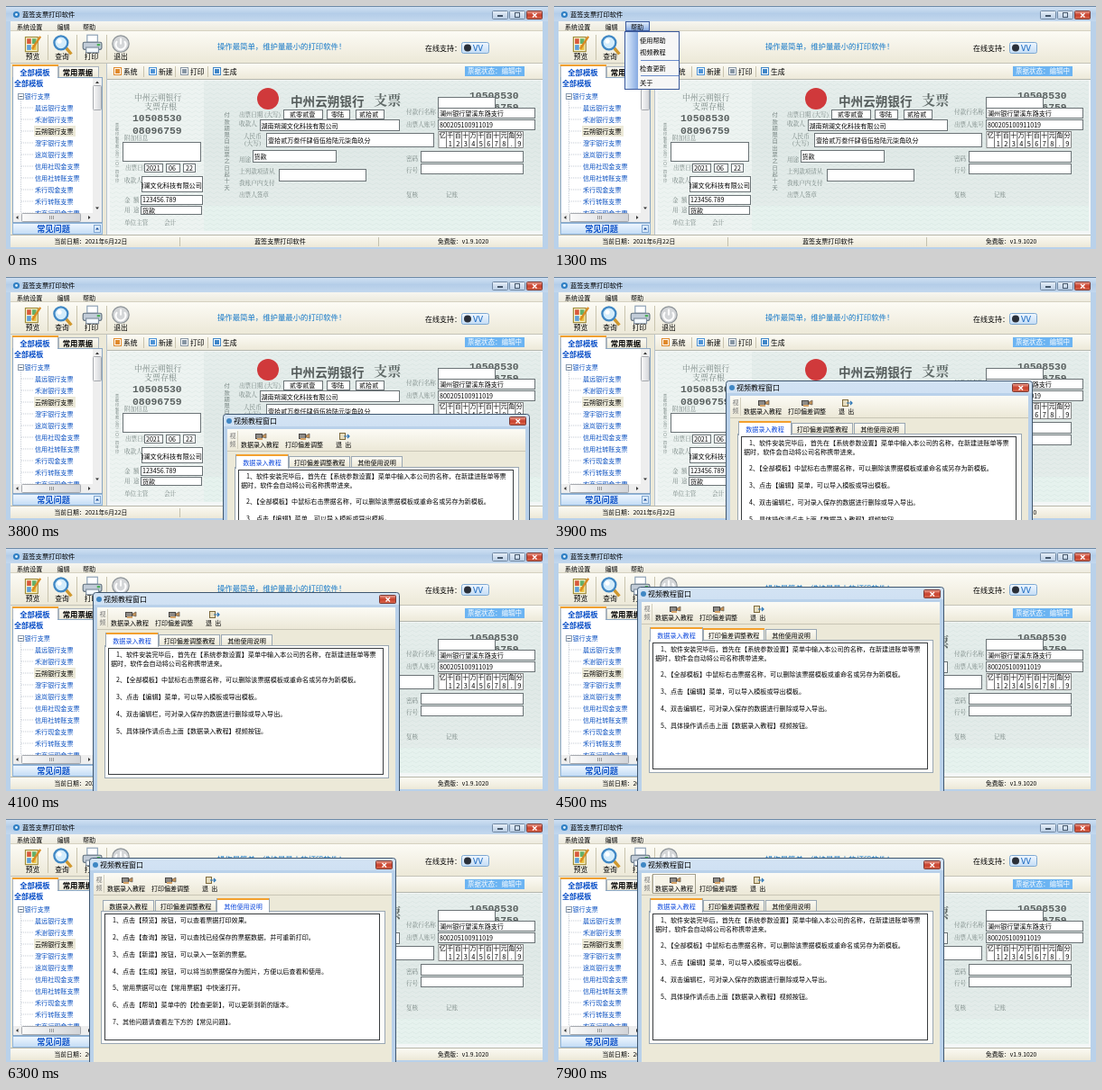
These frames come from a looping animation (600x270 px, 8000 ms). An HTML page:

```html
<!DOCTYPE html>
<html lang="zh-CN">
<head>
<meta charset="utf-8">
<title>支票打印</title>
<style>
html, body { margin: 0; width: 100%; height: 100%; overflow: hidden; background: #b9d1ea; }
svg { display: block; width: 600px; height: 270px; }
text { font-family: "Noto Sans CJK SC", "Noto Sans CJK", "Noto Sans CJK JP", sans-serif; font-weight: 500; white-space: pre; }
.bold { font-weight: 700; }
.num { font-family: "Liberation Mono", "DejaVu Sans Mono", monospace; font-weight: 700; }
.song { font-family: "Noto Serif CJK SC", "Noto Sans CJK SC", "Noto Sans CJK", serif; }
.dialog { animation: drag 8s step-end infinite; }
@keyframes drag {
  0% { opacity: 0; transform: translate(265px, 183px); }
  32.5% { opacity: .7; transform: translate(265px, 183px); }
  33.75% { opacity: 1; transform: translate(265px, 183px); }
  47.5% { opacity: 1; transform: translate(240px, 152px); }
  48.75% { opacity: 1; transform: translate(190px, 115px); }
  50% { opacity: 1; transform: translate(135px, 76px); }
  51.25% { opacity: 1; transform: translate(96px, 49px); }
  52.5% { opacity: 1; transform: translate(93px, 45px); }
  53.75%, 100% { opacity: 1; transform: translate(92px, 43px); }
}
</style>
</head>
<body>
<svg id="stage" viewBox="0 0 600 270" xmlns="http://www.w3.org/2000/svg"></svg>
<script>
const LOOP = 8000;
const rules = [];

// ---- drawing helpers ----
const rect = (x, y, w, h, fill, more = '') =>
  `<rect x="${x}" y="${y}" width="${w}" height="${h}" fill="${fill}" ${more}/>`;
const box = (x, y, w, h, fill = '#fff', stroke = '#6b7376', more = '') =>
  rect(x + .5, y + .5, w - 1, h - 1, fill, `stroke="${stroke}" ${more}`);
const text = (x, y, s, size = 7.1, fill = '#000', more = '') =>
  `<text x="${x}" y="${(y + size * .37).toFixed(2)}" font-size="${size}" fill="${fill}" ${more}>${s}</text>`;
const path = (d, stroke, width = 1, fill = 'none', more = '') =>
  `<path d="${d}" stroke="${stroke}" stroke-width="${width}" fill="${fill}" ${more}/>`;
const disc = (x, y, r, fill, more = '') => `<circle cx="${x}" cy="${y}" r="${r}" fill="${fill}" ${more}/>`;
const grad = (id, across, ...stops) => `<linearGradient id="${id}" x2="${+across}" y2="${+!across}">` +
  stops.map((c, i) => `<stop offset="${i / (stops.length - 1)}" stop-color="${c}"/>`).join('') + '</linearGradient>';
const bold = 'class="bold"', mid = 'text-anchor="middle"';

// Shows a group only during the given [start, end] spans in ms.
function during(id, spans, body) {
  const at = (ms, o) => `${ms / LOOP * 100}%{opacity:${o}}`;
  rules.push(`@keyframes ${id}{0%{opacity:0}${spans.map(([a, b]) => at(a, 1) + at(b, 0)).join('')}}` +
    `.${id}{animation:${id} ${LOOP}ms step-end infinite}`);
  return `<g class="${id}">${body}</g>`;
}

const defs = `<defs>
${grad('glass', false, '#d3e3f4', '#b4cde8', '#c3d8ee')}
${grad('menu', false, '#f7f6f0', '#ece9dc')}
${grad('bar', false, '#fcfbf5', '#ece8d7')}
${grad('red', false, '#eba596', '#c8402c', '#d9694e')}
${grad('knob', false, '#e6eef7', '#b9cde4')}
${grad('thumb', true, '#fafafa', '#d2d4d8')}
${grad('blue', false, '#f0f7ff', '#c3dcf5')}
${grad('open', false, '#e3effd', '#86aae2')}
${grad('gutter', true, '#e3effd', '#86aae2')}
${grad('paper', false, '#e6eeec', '#e0e9e7', '#e4ecea')}
<pattern id="weave" width="8" height="5" patternUnits="userSpaceOnUse">
<path d="M0 2.5Q2 0 4 2.5T8 2.5" fill="none" stroke="#a9c3bf" stroke-width=".5" opacity=".3"/></pattern>
<clipPath id="payee"><rect x="150" y="190" width="68" height="16"/></clipPath>
<clipPath id="tree"><rect x="8" y="79" width="87" height="151"/></clipPath>
</defs>`;

// ---- main window ----
function titleBar() {
  const cross = path('M583 8l4.5 4.5m0-4.5l-4.5 4.5', '#fff', 1.4);
  return rect(0, 0, 600, 270, '#b9d1ea') + rect(0, 0, 600, 17, 'url(#glass)') + rect(0, 0, 600, 1, '#6d8aa6') +
    disc(11.5, 9.5, 3.6, '#2f7fc4') + disc(11.5, 9.5, 1.4, '#d9ecfa') +
    text(18, 9.5, '蓝签支票打印软件', 7.3) +
    box(538, 5, 18, 10, 'url(#knob)', '#7088a3', 'rx="1"') + box(557, 5, 18, 10, 'url(#knob)', '#7088a3', 'rx="1"') +
    box(576, 5, 18, 10, 'url(#red)', '#7b3a35', 'rx="1"') +
    rect(544, 10, 6, 2, '#44566a') + box(563, 7, 6, 6, 'none', '#44566a') + cross;
}

const hot = (x, y, w, h) => box(x, y, w, h, '#ffe3ac', '#3c5a9c');

function menuBar() {
  return rect(5, 17, 589, 11, 'url(#menu)') + rect(5, 27, 589, 1, '#d5d1c0') +
    during('editHot', [[600, 900]], hot(52, 17, 25, 11)) +
    during('helpHot', [[900, 1300]], hot(79, 17, 27, 11)) +
    during('helpOpen', [[1300, 2600]], box(79, 17, 27, 11, 'url(#open)', '#3c5a9c')) +
    text(12, 23, '系统设置') + text(56.5, 23, '编辑') + text(85, 23, '帮助');
}

function toolBar() {
  const grow = (x, body) => `<g transform="translate(${x} 42) scale(1.15) translate(${-x} -40)">${body}</g>`;
  const preview = box(22, 33, 13, 15, '#f8f4cf', '#a08c3a') + rect(24, 35, 4, 5, '#d8583c') + rect(29, 35, 4, 5, '#65b06a') +
    rect(24, 41, 4, 5, '#5c9fd8') + rect(29, 41, 4, 5, '#e8c040') + path('M37 33L29 45', '#d98a22', 2);
  const search = path('M66 44l5 6', '#d0982e', 3) +
    disc(61, 39, 6.5, '#d4edfc', 'stroke="#3f87c4" stroke-width="2"') + disc(59.5, 37.5, 2.2, '#fff');
  const print = box(90, 31, 11, 8, '#fff', '#8ba0b5') + box(86, 38, 19, 8, '#c2ccd8', '#62727f', 'rx="1.5"') +
    box(89, 43, 13, 6, '#f3f8fc', '#8090a0') + rect(100, 40, 3, 2, '#4cb05a');
  const quit = disc(127, 40, 8, '#d4d6d8', 'stroke="#8e9498"') +
    path('M123.5 37.5a4.8 4.8 0 1 0 7 0M127 34.5v6', '#fff', 1.8);
  const words = ['预览', '查询', '打印', '退出'].map((s, i) => text(29.5 + i * 32.5, 56.5, s, 7.8, '#000', mid)).join('');
  const lines = [46, 78, 111].map(x => rect(x, 32, 1, 28, '#c9c4ae')).join('');
  return rect(5, 28, 589, 36, 'url(#bar)') + rect(5, 63, 589, 1, '#c4c3b8') + lines +
    grow(29.5, preview) + grow(62, search) + grow(95, print) + grow(127, quit) + words +
    text(234, 45, '操作最简单，维护量最小的打印软件！', 8.4, '#1478c8') +
    text(464, 47, '在线支持：', 8) +
    box(504, 40, 31, 13, 'url(#blue)', '#7fa9d2', 'rx="2"') + disc(511, 46.5, 4, '#2a2f38') +
    text(517, 46.5, 'VV', 9.5, '#1263bd');
}

function sidePanel() {
  const names = ['晨远银行支票', '禾澍银行支票', '云朔银行支票', '澄宇银行支票', '途岚银行支票', '信用社现金支票',
    '信用社转账支票', '禾行现金支票', '禾行转账支票', '农商行现金支票'];
  const rows = names.map((s, i) => {
    const y = 113 + i * 13;
    return (i == 2 ? rect(31, y - 6, 46, 12, '#ece9d8') : '') +
      path(`M17 ${y}h13`, '#aab4c0', .7, 'none', 'stroke-dasharray="1 1"') +
      text(32, y, s, 7.1, i == 2 ? '#000' : '#0a50c0');
  }).join('');
  return rect(5, 64, 107, 190, '#ece9d8') +
    box(58, 67, 45, 13, 'url(#bar)', '#a9b3bd') + box(7, 65, 51, 15, '#fff', '#a9b3bd') + rect(7, 65, 51, 2, '#f0a030') +
    text(32, 73.5, '全部模板', 8.4, '#0b50c8', `class="bold" ${mid}`) +
    text(79.5, 73.5, '常用票据', 8.4, '#000', `class="bold" ${mid}`) +
    box(7, 79, 100, 162, '#fff', '#8aa7c4') + rect(8, 79, 49, 1, '#fff') +
    '<g clip-path="url(#tree)">' +
    text(9, 86, '全部模板', 8.1, '#0b50c8', bold) +
    path('M16.5 104v128', '#aab4c0', .7, 'none', 'stroke-dasharray="1 1"') +
    box(13, 97, 7, 7, '#fff', '#8a9bb0') + path('M14.5 100.5h4', '#345', .8) +
    text(20.5, 100, '银行支票', 7.1, '#0a50c0') + rows + '</g>' +
    rect(96, 80, 10, 150, '#eeeeee') + box(96, 88, 10, 28, 'url(#thumb)', '#a6a9ae', 'rx="1"') +
    path('M99 86l2-2.5 2 2.5zM99 223.5l2 2.5 2-2.5z', 'none', 0, '#333') +
    rect(8, 230, 98, 10, '#eeeeee') + box(17, 230, 66, 10, 'url(#thumb)', '#a6a9ae', 'rx="1"') +
    path('M48.5 233v4m2-4v4m2-4v4', '#777', .7) +
    path('M13.5 233l-2.5 2 2.5 2zM91 233l2.5 2-2.5 2z', 'none', 0, '#333') +
    box(7, 241, 100, 13, 'url(#blue)', '#8fb4da') + text(52.5, 248, '常见问题', 9.2, '#0b50c8', `class="bold" ${mid}`) +
    box(97, 243, 8, 9, '#dcebfa', '#7fa5d0') + path('M99 248.5l2-2.5 2 2.5z', 'none', 0, '#1b4f9c') +
    rect(111, 64, 1, 190, '#b7c4cf');
}

function subBar() {
  const items = [['系统', 119, '#e08a2c'], ['新建', 158, '#4d93d6'], ['打印', 193, '#8795a3'], ['生成', 229, '#3f86c8']];
  return rect(112, 64, 482, 18, 'url(#bar)') + rect(112, 81, 482, 1, '#b4b7ae') +
    items.map(([s, x, c], i) => (i ? rect(x - 6, 67, 1, 12, '#c9c4ae') : '') +
      box(x, 68, 9, 9, '#fff', c) + rect(x + 2, 70, 5, 5, c) + text(x + 11, 73, s, 7.8)).join('') +
    rect(508, 67, 66, 11, '#6cb4f2') + text(541, 72.5, '票据状态：编辑中', 7.5, '#fff', mid);
}

function cheque() {
  const ink = '#74827f';
  const label = (x, y, s) => text(x, y, s, 6.6, ink, 'class="song"');
  const field = (x, y, w, h, s = '', tx = x + 2, ty = y + h / 2) => box(x, y, w, h) + text(tx, ty, s);
  const number = (x, y, s) => text(x, y, s, 11.4, '#5a6160', 'class="num"');
  const cells = [...'亿千百十万千百十元角分'].map((c, i) => {
    const x = 479 + i * 8.5;
    return `<rect x="${x}" y="139.5" width="8.5" height="18" fill="#fff" stroke="#555" stroke-width=".7"/>` +
      text(x + 4.2, 143.8, c, 7, '#000', mid) + text(x + 4.2, 153, ' 12345678.9'[i], 7.4, '#000', mid);
  }).join('');
  const column = (x, y, step, size, s) => [...s].map((c, i) => text(x, y + i * step, c, size, ink, mid)).join('');

  return rect(112, 82, 482, 172, '#f3f6f6') + rect(115, 83, 104, 167, '#edf3f1') + rect(219, 83, 373, 139, 'url(#paper)') +
    rect(219, 222, 373, 28, '#e6f2ee') + rect(115, 83, 477, 167, 'url(#weave)') +
    column(123, 133, 4.7, 4, '票据印制有限公司二〇一四年印') +
    column(244.5, 121, 7.3, 6.2, '付款期限自出票之日起十天') +
    text(168, 102, '中州云朔银行', 8.7, ink, `class="song" ${mid}`) +
    text(171, 112, '支票存根', 9, ink, `class="song" ${mid}`) +
    number(140, 124, '10508530') + number(140, 138, '08096759') +
    label(131, 147, '附加信息') + field(129, 151, 87, 22) +
    label(132, 180, '出票日期') + field(153, 175, 21, 10, '2021') + field(177, 175, 16, 10, '06', 180) + field(196, 175, 14, 10, '22', 199) +
    label(131, 194, '收款人') + box(150, 189, 68, 18) +
    `<g clip-path="url(#payee)">${text(217, 199, '湖南朔澜文化科技有限公司', 7.2, '#000', 'text-anchor="end"')}</g>` +
    label(131, 216, '金  额') + field(149, 210, 69, 11, '123456.789') +
    label(131, 226.5, '用  途') + field(149, 222, 68, 10, '货款') +
    label(131, 241, '单位主管') + label(175, 241, '会计') +
    disc(290, 103, 12, '#d0393b') +
    text(315, 105.5, '中州云朔银行', 13.6, '#555c5b', bold) +
    text(407, 104, '支票', 15.2, '#5f6967', 'class="song bold"') +
    number(513, 99, '10508530') + number(513, 112, '08096759') + box(478, 101, 64, 13) +
    label(258, 121, '出票日期 (大写)') +
    field(307, 115, 44, 11, '贰零贰壹', 314) + field(355, 115, 26, 11, '零陆', 360) + field(387, 115, 32, 11, '贰拾贰', 391) +
    label(258, 131, '收款人') + field(281, 126, 155, 13, '湖南朔澜文化科技有限公司', 282.5, 133) +
    label(443, 118, '付款行名称') + field(478, 113, 108, 12, '澜州银行望溪东路支行', 480) +
    label(443, 132, '出票人账号') + field(478, 126, 108, 12, '800205100911019', 480) +
    label(263, 145, '人民币') + label(260, 153, '（大写）') +
    field(288, 141, 186, 16, '壹拾贰万叁仟肆佰伍拾陆元柒角玖分', 290, 149) + cells +
    label(258, 171, '用途') + field(273, 160, 93, 14, '货款', 274.5, 167.5) +
    label(443, 170, '密码') + field(459, 161, 114, 13) +
    label(443, 183, '行号') + field(459, 175, 114, 12) +
    label(258, 184, '上列款项请从') + field(302, 181, 97, 14) +
    label(258, 197, '我账户内支付') + label(258, 210, '出票人签章') +
    label(443, 210, '复核') + label(487, 210, '记账');
}

function statusBar() {
  return rect(5, 254, 589, 14, 'url(#bar)') + rect(5, 254, 589, 1, '#b8b7aa') +
    [192, 412].map(x => rect(x, 257, 1, 10, '#c4c1ae')).join('') +
    text(53.5, 261.5, '当前日期：2021年6月22日', 6.8) + text(275, 261.5, '蓝签支票打印软件') +
    text(478, 261.5, '免费版：v1.9.1020', 6.7);
}

function helpMenu() {
  const rows = [['使用帮助', 38], ['视频教程', 51.5], ['检查更新', 69], ['关于', 85.5]];
  const hotRow = y => hot(80, y - 6.5, 58, 13);
  return during('drop', [[1300, 2600]],
    box(78, 28, 61, 65, '#f6f6f6', '#3c5a9c') + rect(79, 29, 14, 63, 'url(#gutter)') +
    rect(96, 60, 42, 1, '#6a8ccb') + rect(96, 77, 42, 1, '#6a8ccb') +
    during('hotUse', [[1700, 2100]], hotRow(38)) + during('hotVideo', [[2100, 2600]], hotRow(51.5)) +
    rows.map(([s, y]) => text(95, y, s, 7.2)).join(''));
}

// ---- tutorial dialog, drawn from its own top left corner ----
const tabs = [['数据录入教程', 15, 57], ['打印偏差调整教程', 73, 68], ['其他使用说明', 142, 57]];

function tab(i, state) {
  const [s, x, w] = tabs[i], on = state == 'on';
  return (on ? box(x - 1, 45, w + 2, 16, '#fff', '#9aa7b3') + rect(x, 60, w, 1, '#fff')
    : box(x, 47, w, 13, state ? '#fffdf2' : 'url(#bar)', '#9aa7b3')) +
    (state ? rect(x, on ? 45 : 46, w, 2, '#f3a02e') : '') +
    text(x + w / 2, 54, s, 7.1, on ? '#0a46dc' : '#000', mid);
}

// Each line is [row, indent, words].
function page(id, active, spans, lines) {
  return during(id, spans,
    tabs.map((_, i) => i == active ? '' : tab(i)).join('') + tab(active, 'on') +
    lines.map(([row, dx, s]) => text(20 + dx, 69.5 + row * 9.4, s, 7.1)).join(''));
}

function dialog() {
  const film = x => box(x - 5, 22, 8, 6, '#8d8a86', '#4a4846') + path(`M${x + 3} 24l4 -2v5l-4 -1z`, '#4a4846', .6, '#c8955a') +
    rect(x - 3, 27, 6, 2, '#d7a468');
  const door = box(129, 21, 7, 8, '#e6ddc0', '#7d6a3c') + path('M134 25h6m-2-2l2 2-2 2', '#2e77b8', 1.2);
  const hotTool = x => box(x, 18, 48, 22, '#f7f4e8', '#a39f8c') + path(`M${x + 1.5} 39V19.5h45`, '#fff');
  const data = [
    [0, 6, '1、软件安装完毕后，首先在【系统参数设置】菜单中输入本公司的名称，在新建进账单等票'],
    [1, 0, '据时，软件会自动将公司名称携带进来。'],
    [3, 6, '2、【全部模板】中鼠标右击票据名称，可以删除该票据模板或重命名或另存为新模板。'],
    [5, 6, '3、点击【编辑】菜单，可以导入模板或导出模板。'],
    [7, 6, '4、双击编辑栏，可对录入保存的数据进行删除或导入导出。'],
    [9, 6, '5、具体操作请点击上面【数据录入教程】视频按钮。']];
  const shift = [
    [0, 0, '※打印偏差调整是在按照窗口中进行：'],
    [2, 0, '一、打印偏差一定要首先进行整体偏差调整，即整体移动，很快就能对准。'],
    [4, 14, '通过打印整体移动后，大部分项目都应该能够对准，如果还有少部分项目对不准，再采用'],
    [5, 0, '个别偏差调整。请点击上面的【打印偏差调整】视频教程按纽。'],
    [7, 0, '二、还可以扫描票据背景图上传，我们做好模板后发送到您邮箱。 ' +
      '<tspan fill="#0a2be0" text-decoration="underline">点此上传背景图</tspan>']];
  const other = [
    [0, 6, '1、点击【预览】按钮，可以查看票据打印效果。'],
    [2, 6, '2、点击【查询】按钮，可以查找已经保存的票据数据，并可重新打印。'],
    [4, 6, '3、点击【新建】按钮，可以录入一张新的票据。'],
    [6, 6, '4、点击【生成】按钮，可以将当前票据保存为图片，方便以后查看和使用。'],
    [8, 6, '5、常用票据可以在【常用票据】中快速打开。'],
    [10, 6, '6、点击【帮助】菜单中的【检查更新】，可以更新到新的版本。'],
    [12, 6, '7、其他问题请查看左下方的【常见问题】。']];

  return '<g class="dialog">' +
    box(0, 0, 340, 240, 'url(#glass)', '#3f566e', 'rx="3"') + rect(1, 14, 338, 226, '#b9d1ea') +
    disc(7, 8, 3, '#3f87c4') + text(12, 8, '视频教程窗口', 8) +
    box(317, 3, 19, 10, 'url(#red)', '#7b3a35', 'rx="1"') + path('M324.5 6l4.5 4.5m0-4.5l-4.5 4.5', '#fff', 1.4) +
    rect(5, 17, 330, 223, '#ece9d8') + rect(5, 17, 330, 24, 'url(#bar)') + rect(5, 41, 330, 1, '#c9c6b6') +
    text(11, 24.5, '视', 7, '#777', mid) + text(11, 33, '频', 7, '#777', mid) + rect(16, 19, 1, 20, '#d3cfbd') +
    during('tool1', [[3100, 3200], [7900, 8000]], hotTool(17)) +
    during('tool2', [[3200, 3300]], hotTool(66)) +
    film(41) + film(89) + door +
    text(20, 34, '数据录入教程', 7) + text(69, 34, '打印偏差调整', 7) + text(125, 34, '退  出', 7) +
    box(13, 59, 315, 148, '#fcfcfa', '#9aa7b3') + box(17, 62, 305, 141, '#fff', '#3a3d40') +
    page('page1', 0, [[0, 5300], [7500, 8000]], data) +
    page('page2', 1, [[5300, 6300]], shift) +
    page('page3', 2, [[6300, 7500]], other) +
    during('tabHot2', [[4500, 4800], [4900, 5300]], tab(1, 'hot')) +
    during('tabHot3', [[6000, 6300]], tab(2, 'hot')) +
    during('tabHot1', [[7100, 7500]], tab(0, 'hot')) + '</g>';
}

const scene = defs + titleBar() + menuBar() + toolBar() + sidePanel() + subBar() + cheque() + statusBar() + helpMenu() + dialog();
const sheet = document.createElement('style');
sheet.textContent = rules.join('\n');
document.head.append(sheet);
document.getElementById('stage').innerHTML = scene;
</script>
</body>
</html>
```
